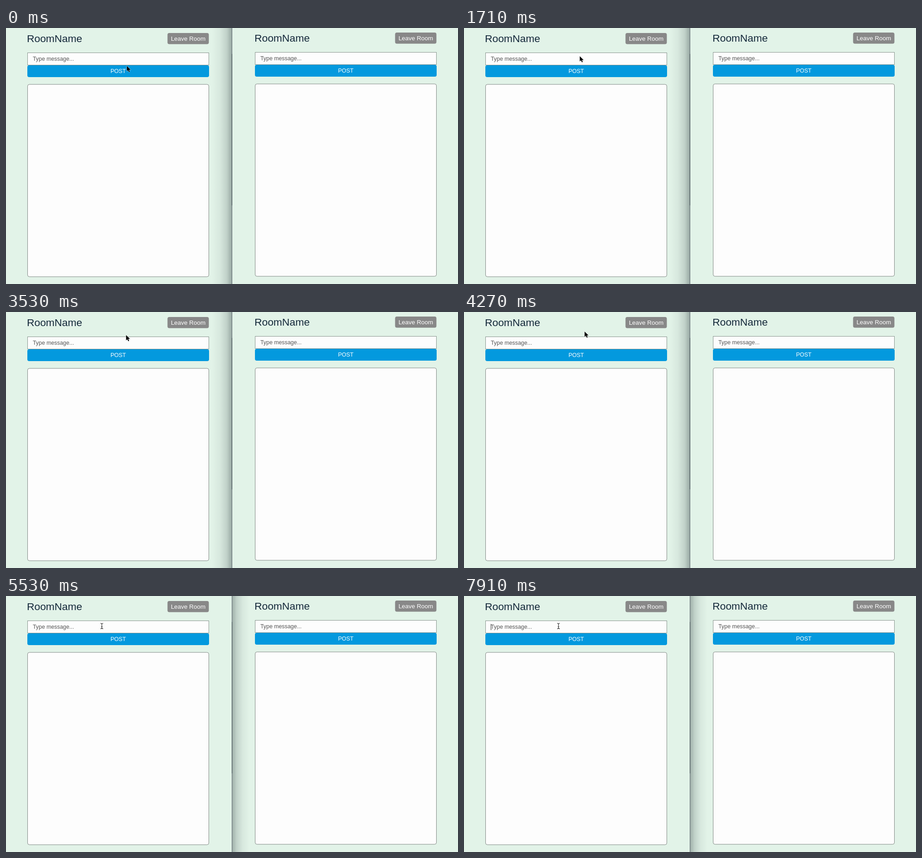
An HTML page for the animation above (8000 ms loop, 995 by 563 pixels).

```html
<!DOCTYPE html>
<html lang="en">
<head>
<meta charset="utf-8">
<title>Chat room</title>
<style>
  html, body { margin: 0; width: 100%; height: 100%; overflow: hidden; background: #e2f3e8; }
  svg { display: block; width: 995px; height: 563px; }
  text { font-family: "Liberation Sans", Arial, sans-serif; }
</style>
</head>
<body>
<svg viewBox="0 0 995 563">
  <defs>
    <linearGradient id="fadeLeft">
      <stop offset="0" stop-color="#4a5a5a" stop-opacity="0"/>
      <stop offset=".4" stop-color="#4a5a5a" stop-opacity=".07"/>
      <stop offset=".75" stop-color="#4a5a5a" stop-opacity=".22"/>
      <stop offset="1" stop-color="#4a5a5a" stop-opacity=".48"/>
    </linearGradient>
    <linearGradient id="fadeRight">
      <stop offset="0" stop-color="#4a5a5a" stop-opacity=".44"/>
      <stop offset=".25" stop-color="#4a5a5a" stop-opacity=".22"/>
      <stop offset=".6" stop-color="#4a5a5a" stop-opacity=".07"/>
      <stop offset="1" stop-color="#4a5a5a" stop-opacity="0"/>
    </linearGradient>
    <g id="room">
      <text x="46" y="31" font-size="22.8" fill="#14283a">RoomName</text>
      <rect x="355.5" y="11" width="91" height="24.5" rx="4" fill="#888"/>
      <text x="401" y="28" font-size="13.45" fill="#fff" text-anchor="middle">Leave Room</text>
      <rect x="47.5" y="54.5" width="399" height="27" fill="#fdfdfd" stroke="#87938d"/>
      <text x="59" y="72" font-size="12.35" fill="#555">Type message...</text>
      <rect x="47" y="82" width="400" height="26" rx="4" fill="#0399de"/>
      <text x="247" y="98.5" font-size="12.5" fill="#fff" text-anchor="middle">POST</text>
      <rect x="47.5" y="124" width="399" height="423" rx="4" fill="#fdfdfd" stroke="#7f8783"/>
    </g>
  </defs>
  <rect width="995" height="563" fill="#e2f3e8"/>
  <rect id="leftShade" x="453" width="44" height="563" fill="url(#fadeLeft)"/>
  <rect id="rightShade" x="498" width="38" height="563" fill="url(#fadeRight)"/>
  <rect x="497" width="1" height="563" fill="#59636a"/>
  <rect x="497" y="57" width="1" height="333" fill="#26303a"/>
  <use href="#room"/>
  <use href="#room" x="501" y="-1"/>
  <path id="caret" d="M59.5 61.5V75" stroke="#222" fill="none"/>
  <path id="arrow" d="M0 0V11.6L2.7 9.1L4.7 13.5L6.7 12.6L4.8 8.4H8.6Z" fill="#000" stroke="#fff" stroke-width=".9" stroke-linejoin="round" paint-order="stroke"/>
  <g id="beam" fill="none">
    <path d="M-3-6Q0-6 0-4Q0-6 3-6M0-4V4M-3 6Q0 6 0 4Q0 6 3 6M-1.5 1.5H1.5" stroke="#fff" stroke-width="2.4"/>
    <path d="M-3-6Q0-6 0-4Q0-6 3-6M0-4V4M-3 6Q0 6 0 4Q0 6 3 6M-1.5 1.5H1.5" stroke="#222" stroke-width="1.1"/>
  </g>
</svg>
<script>
const LOOP = 8000;
const ACTIVATE = 5130;   // the left window comes to the front
const BEAM_AT = 5400;
const FOCUS = 5650;      // the field takes focus and its caret blinks

// time, x, y of the pointer
const path = [
  [0, 266, 83.5], [1710, 254.8, 62], [2830, 263.3, 58],
  [4270, 265.5, 43], [5250, 237.5, 66.5], [5600, 208, 66]
];

const el = id => document.getElementById(id);
const clamp = v => Math.max(0, Math.min(1, v));
const ease = v => v * v * (3 - 2 * v);
const ramp = (t, from, to) => clamp((t - from) / (to - from));
const show = (id, on) => el(id).setAttribute("visibility", on ? "visible" : "hidden");

function pointer(t) {
  let i = 0;
  while (i < path.length - 2 && t >= path[i + 1][0]) i++;
  const [t0, x0, y0] = path[i], [t1, x1, y1] = path[i + 1];
  const k = ease(ramp(t, t0, t1));
  return [x0 + (x1 - x0) * k, y0 + (y1 - y0) * k];
}

function draw(t) {
  const move = `translate(${pointer(t).join(" ")})`;
  el("arrow").setAttribute("transform", move);
  el("beam").setAttribute("transform", move);
  show("arrow", t < BEAM_AT);
  show("beam", t >= BEAM_AT);
  show("caret", t >= FOCUS && (t - FOCUS) % 1000 < 500);
  el("leftShade").setAttribute("opacity", 1 - ramp(t, ACTIVATE, ACTIVATE + 100));
  el("rightShade").setAttribute("opacity", ramp(t, ACTIVATE + 70, ACTIVATE + 270));
}

const start = performance.now();
function tick() {
  draw((performance.now() - start) % LOOP);
  requestAnimationFrame(tick);
}
tick();
</script>
</body>
</html>
```
